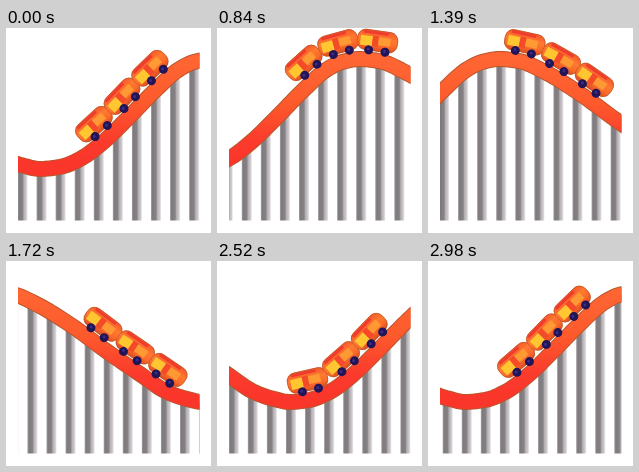
An HTML page that plays this animation: 205x205 px, repeating every 3020 ms.

```html
<!DOCTYPE html>
<html>
<head>
<meta charset="utf-8">
<title>Roller coaster</title>
<style>
html, body { margin: 0; width: 100%; height: 100%; overflow: hidden; background: #fff; }
svg { display: block; width: 100vw; height: 100vh; }
</style>
</head>
<body>
<svg viewBox="0 0 205 205">
  <defs>
    <clipPath id="view"><rect x="12" y="0" width="181.5" height="192.5"/></clipPath>
    <clipPath id="shell"><rect x="-20.5" y="-10.5" width="41" height="21" rx="8.5"/></clipPath>
    <linearGradient id="rail" gradientUnits="userSpaceOnUse" x1="0" y1="30" x2="0" y2="142">
      <stop offset="0" stop-color="#ff6633"/>
      <stop offset=".4" stop-color="#fd5a2c"/>
      <stop offset=".75" stop-color="#fb3a2c"/>
      <stop offset="1" stop-color="#fa352a"/>
    </linearGradient>
    <linearGradient id="steel">
      <stop offset="0" stop-color="#a6a2a6"/>
      <stop offset=".15" stop-color="#7e7a7e"/>
      <stop offset=".5" stop-color="#858185"/>
      <stop offset=".65" stop-color="#b4b0b4"/>
      <stop offset=".85" stop-color="#cac6ca"/>
      <stop offset="1" stop-color="#ebe7eb"/>
    </linearGradient>
    <linearGradient id="paint" x2="0" y2="1">
      <stop offset="0" stop-color="#f4552c"/>
      <stop offset=".4" stop-color="#ff7a30"/>
      <stop offset=".7" stop-color="#fb6a2a"/>
      <stop offset="1" stop-color="#d8481f"/>
    </linearGradient>
    <g id="car">
      <g clip-path="url(#shell)">
        <rect x="-21" y="-11" width="42" height="22" fill="url(#paint)"/>
        <rect x="-17" y="-4" width="12" height="10" fill="#ffc632"/>
        <rect x="-5" y="-5" width="6" height="11" fill="#f54a2a"/>
        <rect x="1" y="-4" width="12" height="8" fill="#ff9933"/>
        <path d="M-15-8H10" stroke="#f03c2c" stroke-width="3"/>
      </g>
      <rect x="-20.2" y="-10.2" width="40.4" height="20.4" rx="8.2" fill="none" stroke="#b8582c" stroke-width=".7"/>
      <g fill="#211457">
        <circle cx="-7.5" cy="10" r="4.5"/>
        <circle cx="9" cy="10" r="4.5"/>
      </g>
      <g fill="#3c2e86">
        <circle cx="-8" cy="9.3" r="1.5"/>
        <circle cx="8.5" cy="9.3" r="1.5"/>
      </g>
    </g>
  </defs>
  <g clip-path="url(#view)">
    <g id="pillars"></g>
    <g fill="none">
      <path class="line" stroke="#b9552c" stroke-width="16"/>
      <path class="line" stroke="url(#rail)" stroke-width="14"/>
    </g>
  </g>
  <g id="cars"></g>
</svg>
<script>
const LOOP = 3020, FRAMES = 72, PERIOD = 381.4, GAP = PERIOD / 20;
const CAR_HEIGHT = 19.5, CAR_SPACING = 39.5;

// Monotone cubic through [x, y] points that repeat every `period`, rising by `rise`.
function curve(points, period, rise) {
  const n = points.length;
  const at = i => {
    const k = Math.floor(i / n), [x, y] = points[i - k * n];
    return [x + k * period, y + k * rise];
  };
  const slope = i => (at(i + 1)[1] - at(i)[1]) / (at(i + 1)[0] - at(i)[0]);
  const tangent = i => {
    const a = slope(i - 1), b = slope(i);
    return a * b > 0 ? 2 * a * b / (a + b) : 0;
  };
  return x => {
    const k = Math.floor((x - points[0][0]) / period);
    const local = x - k * period;
    let i = 0;
    while (at(i + 1)[0] <= local) i++;
    const [x0, y0] = at(i), [x1, y1] = at(i + 1);
    const w = x1 - x0, t = (local - x0) / w, r = 1 - t;
    return y0 * r * r * (1 + 2 * t) + y1 * t * t * (3 - 2 * t)
      + w * t * r * (r * tangent(i) - t * tangent(i + 1)) + k * rise;
  };
}

const trackY = curve([[34, 141], [55, 138.7], [75, 130.5], [96, 115], [120, 92], [150, 61.5],
  [172, 42], [188, 34], [205, 31], [225, 33], [250, 43.5], [285, 65], [320, 90.5],
  [355, 114.5], [380, 131], [400, 138]], PERIOD, 0);
const travel = curve([[0, 0], [10, 32], [20, 63], [33, 134], [50, 308], [60, 343]],
  FRAMES, PERIOD);
const trainX = curve([[0, 116], [10, 114], [20, 121], [33, 133], [50, 124.5], [60, 124]],
  FRAMES, 0);

// Point at height h above the rail, with the local direction.
function above(u, h) {
  const angle = Math.atan((trackY(u + 3) - trackY(u - 3)) / 6);
  return { x: u + h * Math.sin(angle), y: trackY(u) - h * Math.cos(angle), angle };
}

function add(parent, tag, attrs) {
  const el = document.createElementNS('http://www.w3.org/2000/svg', tag);
  for (const key in attrs) el.setAttribute(key, attrs[key]);
  return parent.appendChild(el);
}

const byId = id => document.getElementById(id);
const pillars = Array.from({ length: 12 }, () =>
  add(byId('pillars'), 'rect', { width: 10, fill: 'url(#steel)' }));
const cars = Array.from({ length: 3 }, () => add(byId('cars'), 'use', { href: '#car' }));
const lines = document.querySelectorAll('.line');

function railPath(shift) {
  let d = '';
  for (let x = -12; x <= 218; x += 3) {
    d += `${d ? 'L' : 'M'}${x} ${trackY(x + shift).toFixed(2)}`;
  }
  return d;
}

function findCenter(x) {
  let low = x - 30, high = x + 30;
  for (let i = 0; i < 22; i++) {
    const mid = (low + high) / 2;
    if (above(mid, CAR_HEIGHT).x < x) low = mid; else high = mid;
  }
  return low;
}

function neighbour(u, direction) {
  const from = above(u, CAR_HEIGHT);
  let p, v = u;
  do {
    v += direction * 0.2;
    p = above(v, CAR_HEIGHT);
  } while (Math.hypot(p.x - from.x, p.y - from.y) < CAR_SPACING);
  return p;
}

function draw(frame) {
  const shift = travel(frame);
  const first = ((16.5 - shift) % GAP + GAP) % GAP - GAP;
  pillars.forEach((pillar, i) => {
    const x = first + i * GAP, top = trackY(x + shift);
    pillar.setAttribute('x', x - 5);
    pillar.setAttribute('y', top);
    pillar.setAttribute('height', 195 - top);
  });

  const rail = railPath(shift);
  lines.forEach(line => line.setAttribute('d', rail));

  const center = findCenter(trainX(frame) + shift);
  [neighbour(center, -1), above(center, CAR_HEIGHT), neighbour(center, 1)].forEach((p, i) =>
    cars[i].setAttribute('transform',
      `translate(${p.x - shift} ${p.y}) rotate(${p.angle * 180 / Math.PI})`));
}

const start = performance.now();
function tick() {
  const time = (performance.now() - start) % LOOP;
  draw(Math.floor((time + 3) * FRAMES / LOOP) % FRAMES);
  requestAnimationFrame(tick);
}
tick();
</script>
</body>
</html>
```
